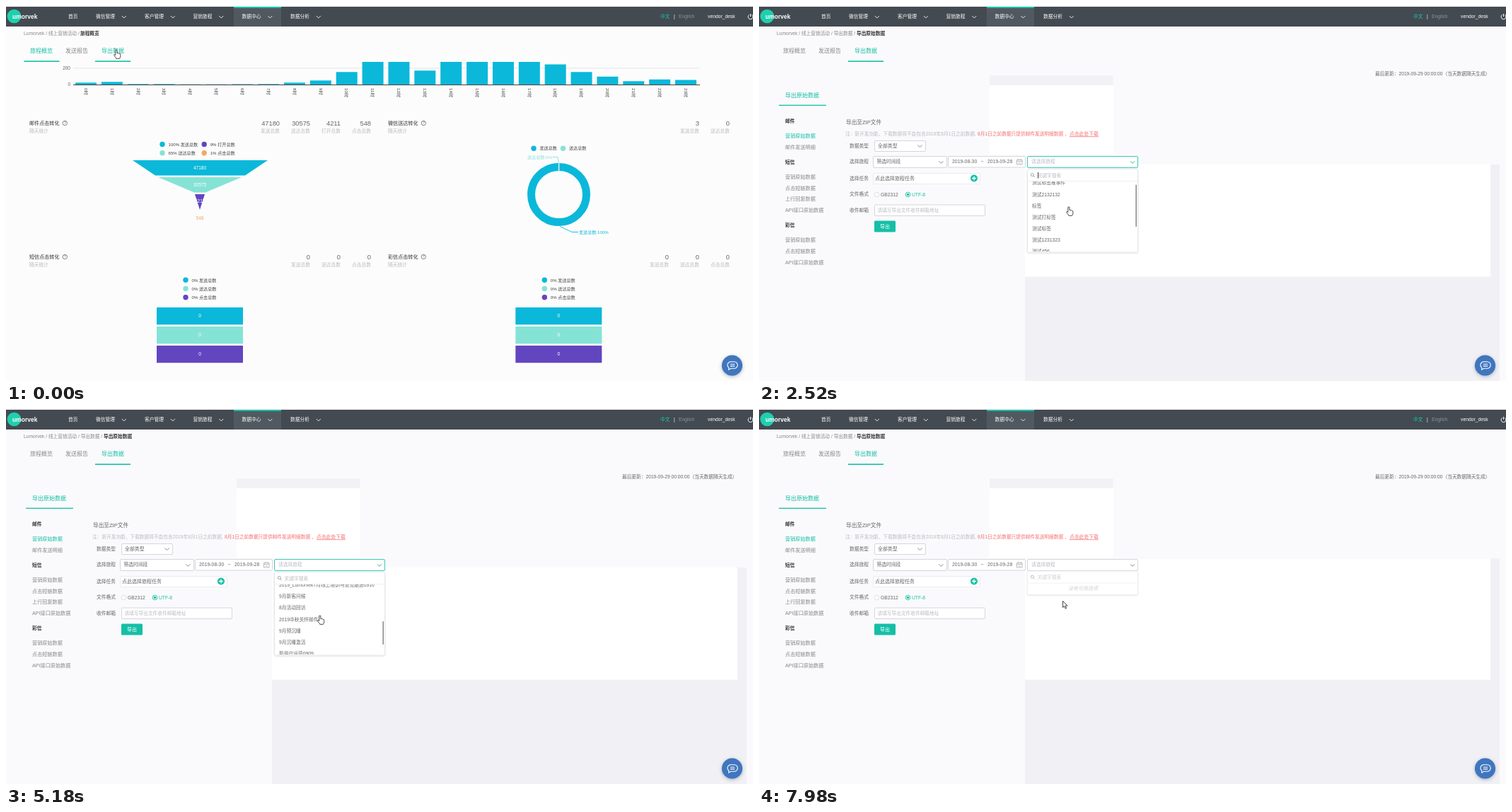
Recreate the animation shown at these times as an HTML page. Size 1056 by 530 pixels, loop 8000 ms.

```html
<!DOCTYPE html>
<html lang="zh-CN">
<head>
<meta charset="utf-8">
<title>导出数据</title>
<style>
  html, body { margin: 0; width: 100%; height: 100%; overflow: hidden; background: #fcfcfc; }
  svg { display: block; width: 1056px; height: 530px; }
  text { font-family: "Liberation Sans", "Noto Sans CJK SC", "Noto Sans CJK", sans-serif; white-space: pre; }
</style>
</head>
<body>
<svg id="stage" viewBox="0 0 1056 530" xmlns="http://www.w3.org/2000/svg"></svg>
<script>
const TEAL = '#14bfa6', CYAN = '#0bb8da', MINT = '#85e3d6', PURPLE = '#6246c0', ORANGE = '#f3a862';
const DARK = '#444', MID = '#666', GRAY = '#888', PALE = '#b9bbc0', EDGE = '#d3d6de';

// Drawing helpers; text is placed by its vertical centre
const text = (x, y, s, size = 6.75, fill = MID, extra = '') =>
  `<text x="${x}" y="${(y + size * 0.36).toFixed(2)}" font-size="${size}" fill="${fill}" ${extra}>${s}</text>`;
const mid = (x, y, s, size, fill) => text(x, y, s, size, fill, 'text-anchor="middle"');
const end = (x, y, s, size, fill) => text(x, y, s, size, fill, 'text-anchor="end"');
const rect = (x, y, x2, y2, fill, extra = '') =>
  `<rect x="${x}" y="${y}" width="${x2 - x}" height="${y2 - y}" fill="${fill}" ${extra}/>`;
const frame = (x, y, x2, y2, color = EDGE, extra = '') =>
  rect(x + .5, y + .5, x2 - .5, y2 - .5, '#fff', `rx="1.5" stroke="${color}" ${extra}`);
const dot = (x, y, r, fill, extra = '') => `<circle cx="${x}" cy="${y}" r="${r}" fill="${fill}" ${extra}/>`;
const path = (d, stroke, w = 1, fill = 'none') =>
  `<path d="${d}" fill="${fill}" stroke="${stroke}" stroke-width="${w}"/>`;
const chevron = (x, y, color = GRAY) => path(`M${x - 3} ${y - 1.5}l3 3l3-3`, color);
const group = (id, body, extra = '') => `<g id="${id}" ${extra}>${body}</g>`;
const BOLD = 'font-weight="600"';

function navBar() {
  const items = [[127, '微信管理'], [196, '客户管理'], [264.5, '营销旅程'], [333.5, '数据中心'], [402, '数据分析']];
  return rect(0, 1, 1056, 29, '#434a51') + rect(322, 1, 389, 29, '#505960') + rect(322, 1, 389, 3, TEAL) +
    dot(11.5, 14.5, 9.8, '#1fcfae') + text(9, 14.5, 'umorvek', 8.5, '#fff', BOLD) +
    text(88, 15, '首页', 6.75, '#fff') +
    items.map(([x, s]) => text(x, 15, s, 6.75, '#fff') + chevron(x + 39.8, 15.5, '#e4e6e8')).join('') +
    text(925, 14.5, '中文', 6.75, '#17cbb0') + text(944, 14.5, '|', 6.75, '#fff') +
    text(951, 14.5, 'English', 6.75, '#8d9398') + text(992, 14.5, 'vendor_desk', 6.75, '#fff') +
    path('M1050.7 12.4a3.4 3.4 0 1 0 3.6 0M1052.5 11v4', '#fff');
}

function crumbs(parts, last, x) {
  return text(25, 39, parts, 6.7, GRAY) + text(x, 39, last, 6.7, '#333', BOLD);
}

function tabs(first) {
  const line = x => rect(x, 77.4, x + 50, 79, TEAL);
  return text(34, 63.5, '旅程概览', 8, first ? TEAL : GRAY) + text(84, 63.5, '发送报告', 8, GRAY) +
    text(135, 63.5, '导出数据', 8, TEAL) + (first ? line(25.5) : '') + line(126);
}

function barChart() {
  const heights = [3, 4, 1, 1, .6, .6, .8, 1, 3, 6, 18, 33, 33, 20, 33, 33, 33, 33, 28.5, 18, 11.5, 5, 7.5, 6.8];
  let s = end(91, 88, 200, 6.5) + end(91, 111, 0, 6.5) + rect(95, 87.5, 981, 88.3, '#e0e0e0');
  heights.forEach((h, i) => {
    const x = 98 + 36.87 * i;
    s += rect(x, 111.3 - h, x + 30, 111.3, CYAN);
    s += `<g transform="translate(${x + 15} 116) rotate(90)">${text(0, 0, i + '时', 6.2, DARK)}</g>`;
  });
  return s + rect(761.7, 82, 791.7, 83, MINT) + rect(95, 111, 981, 112, '#444');
}

function cardHead(x, y, title, right, stats) {
  const n = stats.length;
  return text(x, y, title, 7.1, '#333') + text(x, y + 11, '隔天统计', 6.75, PALE) +
    dot(x + 50.3, y, 3.2, 'none', 'stroke="#666" stroke-width=".8"') + mid(x + 50.3, y, '?', 5, MID) +
    stats.map(([v, name], i) => {
      const rx = right - 43 * (n - 1 - i);
      return end(rx, y, v, 9.3, MID) + end(rx, y + 11, name, 6.75, PALE);
    }).join('');
}

const legend = (x, y, color, s) => dot(x, y, 3.7, color) + text(x + 8.5, y, s, 6.1, DARK);

function stack(dx) {
  const names = ['发送总数', '送达总数', '点击总数'];
  return [CYAN, MINT, PURPLE].map((c, i) =>
    legend(254 + dx, 387.3 + 12.2 * i, c, '0% ' + names[i]) +
    rect(213 + dx, 426 + 27 * i, 335 + dx, 450.3 + 27 * i, c) +
    mid(274 + dx, 437.5 + 27 * i, 0, 6.5, '#fff')).join('');
}

function overview() {
  const zero = ['发送总数', '送达总数', '点击总数'].map(s => [0, s]);
  const funnel = [['179 218 370 218 338 239.5 211 239.5', CYAN], ['215 242 333 242 282 263.5 266 263.5', MINT],
    ['267 266 281 266 274 288', PURPLE]].map(([p, c]) => `<polygon points="${p}" fill="${c}"/>`).join('');
  return rect(0, 29, 1056, 530, '#fcfcfc') + group('chart', barChart(), 'clip-path="url(#chartClip)"') +
    crumbs('Lumorvek / 线上营销活动 / ', '旅程概览', 105) + tabs(true) +
    cardHead(33, 165.5, '邮件点击转化', 516, [[47180, '发送总数'], [30575, '送达总数'], [4211, '打开总数'], [548, '点击总数']]) +
    cardHead(540, 165.5, '微信送达转化', 1023, [[3, '发送总数'], [0, '送达总数']]) +
    cardHead(33, 354.5, '短信点击转化', 516, zero) + cardHead(540, 354.5, '彩信点击转化', 1023, zero) +
    legend(221, 195.5, CYAN, '100% 发送总数') + legend(280.2, 195.5, PURPLE, '9% 打开总数') +
    legend(221, 207.7, MINT, '65% 送达总数') + legend(280.2, 207.7, ORANGE, '1% 点击总数') + funnel +
    mid(274, 228.5, 47180, 6.5, '#fff') + mid(274, 252.5, 30575, 6.5, '#fff') +
    mid(274, 276, 4211, 6.5, '#fff') + mid(274, 300, 548, 6.5, ORANGE) +
    legend(746, 201.2, CYAN, '发送总数') + legend(787.5, 201.2, MINT, '送达总数') +
    dot(781.5, 266.5, 39, 'none', `stroke="${CYAN}" stroke-width="11"`) + rect(781, 221, 782.2, 234, '#fff') +
    text(737, 213.5, '送达总数:0%', 6.1, MINT) + path('M772.5 213.5H780L781.5 222', MINT, .9) +
    text(810, 319.5, '发送总数:100%', 6.1, CYAN) + path('M783 311.5L800 319.5H809', CYAN, .9) +
    stack(0) + stack(507.3);
}

function sidebar() {
  const heads = [[162.3, '邮件'], [220.5, '短信'], [310, '彩信']];
  const links = [[199, '邮件发送明细'], [241, '营销原始数据'], [257, '点击短链数据'], [272.3, '上行回复数据'],
    [288, 'API接口原始数据'], [330.5, '营销原始数据'], [346.2, '点击短链数据'], [362, 'API接口原始数据']];
  return text(37, 126, '导出原始数据', 8, TEAL) + rect(28, 139.7, 95, 141, TEAL) +
    heads.map(([y, s]) => text(37, y, s, 6.75, '#333', BOLD)).join('') +
    text(37, 183, '营销原始数据', 7.15, TEAL) + links.map(([y, s]) => text(37, y, s, 7.15, GRAY)).join('');
}

function form() {
  const labels = [[197.2, '数据类型'], [219.8, '选择旅程'], [243.3, '选择任务'], [266, '文件格式'], [288.3, '收件邮箱']];
  return text(123, 164, '导出至ZIP文件', 7.65, MID) +
    text(122, 181, '注：新开发功能，下载数据将不会包含2019年8月1日之前数据,', 6.7, PALE) +
    text(309, 181, '8月1日之前数据只提供邮件发送明细数据', 6.7, '#f56c6c') + text(432, 181, '，', 6.7, '#f56c6c') +
    text(439, 181, '点击此处下载', 6.8, '#f56c6c', 'text-decoration="underline"') +
    labels.map(([y, s]) => text(128, y, s, 6.75, MID)).join('') +
    frame(163, 190, 236, 206) + text(168, 197.8, '全部类型', 6.9) + chevron(227.5, 198) +
    frame(161, 212, 266, 229) + text(166.5, 220, '筛选时间段', 6.75) + chevron(257.5, 220.8) +
    frame(267, 212, 377, 228.5) + text(273, 220, '2019-08-30', 6.9) + text(313.5, 220, '~', 6.9) +
    text(323, 220, '2019-09-28', 6.9) +
    path('M364.5 217.5h7.5v6.5h-7.5zM364.5 219.5h7.5M366.5 216v2M370 216v2M366.5 222h3.5', '#aaa', .8) +
    frame(161, 236, 313, 252, '#eaebef') + text(164, 243.8, '点此选择旅程任务', 7) +
    dot(304, 243.5, 5, TEAL) + path('M301 243.5h6M304 240.5v6', '#fff', 1.3) +
    dot(166.5, 266.5, 3.3, '#fff', `stroke="${EDGE}" stroke-width=".8"`) + text(172, 266.3, 'GB2312', 6.75) +
    dot(210.5, 266.5, 3.3, '#fff', `stroke="${TEAL}" stroke-width=".9"`) + dot(210.5, 266.5, 1.8, TEAL) +
    text(216, 266.3, 'UTF-8', 6.75, TEAL) +
    frame(163, 280.5, 320, 297) + text(167.5, 288.7, '请填写导出文件收件邮箱地址', 6.7, PALE) +
    rect(163, 303.5, 193, 319.5, TEAL, 'rx="1.5"') + mid(178, 311.3, '导出', 7, '#fff') +
    frame(379, 212, 536, 229, EDGE, 'id="box"') + text(385, 220, '请选择旅程', 6.75, PALE) +
    `<path id="arrow" d="M525 219.3l3 3l3-3" fill="none"/>`;
}

function exporter() {
  const ghost = rect(376, 224, 1047, 530, '#f1f1f5', 'id="shade"') + rect(376, 224, 1034, 382.5, '#fff', 'id="sheet"');
  return rect(0, 29, 1056, 530, '#fafafc') + rect(326, 98, 500.5, 112, '#f2f2f6') + rect(326, 112, 500.5, 210, '#fff') +
    group('ghost', ghost) + crumbs('Lumorvek / 线上营销活动 / 导出数据 / ', '导出原始数据', 138) + tabs(false) +
    text(871, 95.5, '最后更新：2019-09-29 00:00:00（当天数据隔天生成）', 6.7) + sidebar() + form();
}

const ROW = 16.15, VIEW = 99;
const options = ['测试标签推事件', '测试2132132', '标签', '测试打标签', '测试标签', '测试1231323', '测试456', '2019国庆邮件',
  '2019_Lumorvek7月线上培训与意见跟进0924', '2019_Lumorvek7月线上培训与意见跟进0916', '9月新客问候', '8月活动回访',
  '2019中秋关怀邮件', '9月预沉睡', '9月沉睡激活', '新用户运营0909', '测试会员标签', '9月第一次全体营销'];

function dropdown() {
  const rows = options.map((s, i) => text(386, 256 + ROW * i, s, 6.75)).join('');
  return frame(379, 230, 536, 348.5, '#e6e7eb', 'id="panel" filter="url(#soft)"') +
    dot(386.3, 238.5, 2, 'none', 'stroke="#999" stroke-width=".9"') + path('M387.8 240l2 2', '#999') +
    text(393.5, 239.2, '关键字搜索', 6.75, PALE) + rect(394, 235, 394.9, 243.5, '#333', 'id="caret"') +
    rect(380, 247.2, 535, 248, '#e9eaee') +
    group('list', `<g clip-path="url(#listClip)">${group('rows', rows)}</g>` + rect(532.4, 249, 534, 308, '#8c8c8c', 'id="thumb" rx=".8"')) +
    group('empty', text(437, 255.2, '没有可用选项', 7, PALE, 'font-style="italic"'));
}

const tooltip = rect(443, 299, 492, 311.5, '#000', 'opacity=".25"') +
  rect(441.5, 296.5, 490, 309.5, '#fff', 'stroke="#858585" stroke-width=".9"') + text(445, 303, '测试1231323', 6.9, '#555');
const hand = path('M-2.2 1.5V-5a1.1 1.1 0 0 1 2.2 0V-1.5q1.2-.6 1.8.3q1.2-.5 1.7.5q1.3-.2 1.3 1.2v2q0 2.2-1.3 3.8h-4.6q-.8-1.7-2.4-3.4q-1.6-2-.3-2.4q.8-.1 1.6 1z', '#333', .9, '#fff');
const pointer = path('M-3-5V4l2.1-1.9l1.6 3.6l1.5-.7l-1.6-3.5h2.9z', '#333', .9, '#fff');
const chat = dot(1026.5, 508, 14.6, '#4176bf', 'filter="url(#glow)"') +
  path('M1024.5 502.8h5a4 4 0 0 1 0 9.4h-5l-2.8 1.7v-2.9a4.6 4.6 0 0 1 2.8-8.2zM1023.8 506.2h6.4M1023.8 508.9h6.4', '#fff', 1.1);

const stage = document.getElementById('stage');
stage.innerHTML = `<defs>
  <clipPath id="chartClip"><rect x="0" y="79" width="1056" height="60"/></clipPath>
  <clipPath id="listClip"><rect x="380" y="248" width="155" height="${VIEW}"/></clipPath>
  <filter id="soft"><feDropShadow dx="0" dy="1" stdDeviation="1" flood-opacity=".13"/></filter>
  <filter id="glow" x="-50%" y="-50%" width="200%" height="200%"><feDropShadow dx="0" dy="1.5" stdDeviation="2.6" flood-color="#456" flood-opacity=".4"/></filter>
  </defs>` + group('overview', overview()) + group('exporter', exporter()) + navBar() +
  group('drop', dropdown()) + group('tip', tooltip) + chat + group('hand', hand) + group('pointer', pointer);

const $ = id => document.getElementById(id);
const show = (id, on) => $(id).setAttribute('display', on ? 'inline' : 'none');
const set = (id, attrs) => Object.entries(attrs).forEach(([k, v]) => $(id).setAttribute(k, v));

// The screen refreshes in bursts: [start, end, steps]
const LOOP = 8000;
const bursts = [[250, 1010, 5], [1440, 2400, 8], [2520, 3210, 6], [3490, 4150, 6], [4460, 5450, 8],
  [5600, 5720, 2], [6030, 7020, 8], [7140, 7980, 7]];
const ticks = [0, ...bursts.flatMap(([a, b, n]) => Array.from({ length: n }, (_, i) => a + (b - a) * i / (n - 1)))];
const hold = t => ticks.filter(k => k <= t + .01).pop();

const cursor = [[0, 157, 68], [250, 157, 68], [820, 448, 224], [1440, 448, 230], [1577, 448, 232], [2250, 439, 290],
  [2520, 439, 290], [3490, 442, 290], [3750, 444, 290], [4150, 447, 293], [4460, 447, 293], [5450, 444, 300],
  [5720, 434, 322], [6200, 434, 322], [7020, 432, 300], [7700, 432.5, 276.5], [8000, 432.5, 276.5]];
const scroll = [[0, 0], [2100, 0], [2520, 6], [3210, 57], [3760, 57], [4150, 55], [4460, 55], [5450, 191.7],
  [6200, 191.7], [7020, 130], [8000, 130]];

function at(track, t) {
  const i = Math.max(1, track.findIndex(k => k[0] >= t));
  const a = track[i - 1], b = track[i], p = (t - a[0]) / (b[0] - a[0]);
  return a.slice(1).map((v, j) => v + (b[j + 1] - v) * p);
}

function draw(time) {
  const t = hold(time), opening = t < 1500, closing = t > 7900, empty = t > 7800;
  show('overview', t < 250);
  show('exporter', t >= 250);
  show('ghost', t > 1500);
  const top = closing ? 211.5 : 224;
  set('shade', { y: top, height: 530 - top });
  set('sheet', { y: top, height: 382.5 - top });
  const focus = t >= 820 && !closing;
  set('box', { stroke: focus ? '#3cc9b4' : EDGE });
  set('arrow', { stroke: focus ? TEAL : GRAY });

  show('drop', t >= 1440);
  set('drop', { opacity: opening ? .6 : closing ? .7 : 1, transform: `translate(0 ${opening ? -5 : closing ? -1.5 : 0})` });
  set('panel', { height: empty ? 33.5 : 117.5 });
  show('list', !empty);
  show('empty', empty);
  show('caret', !empty && Math.floor((t - 1440) / 520) % 2 === 0);
  const [y] = at(scroll, t), size = ROW * (t < 4500 ? 10 : options.length);
  set('rows', { transform: `translate(0 ${-y})` });
  set('thumb', { y: 249 + 97 * y / size, height: 97 * VIEW / size });
  show('tip', t > 3600 && t < 4100);

  const [cx, cy] = at(cursor, t), move = { transform: `translate(${cx} ${cy})` };
  set('hand', move);
  set('pointer', move);
  show('hand', !empty);
  show('pointer', empty);
}

const start = performance.now();
function tick() {
  draw((performance.now() - start) % LOOP);
  requestAnimationFrame(tick);
}
tick();
</script>
</body>
</html>
```
